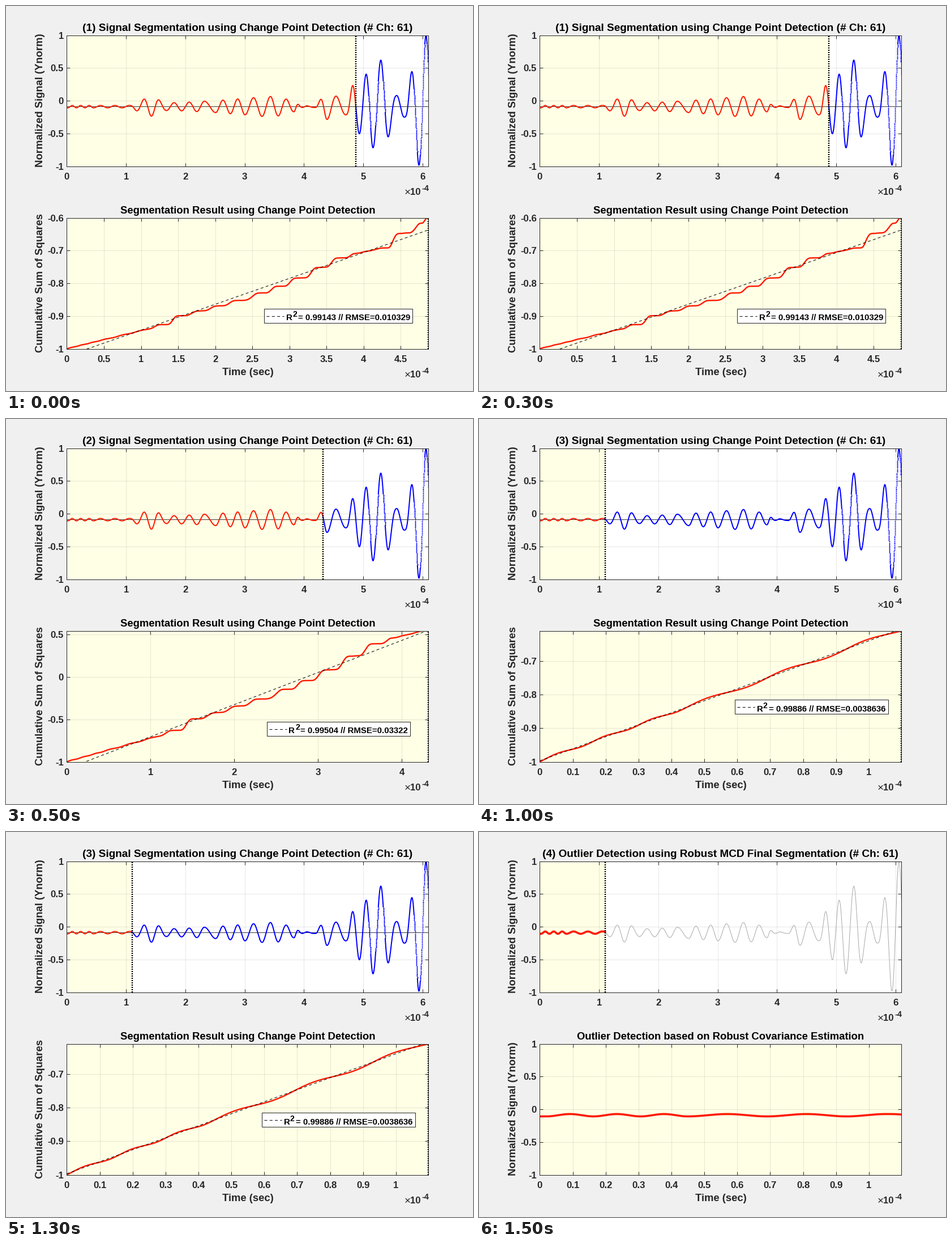
Animation, 825 px wide and 679 px high, one loop 2 s. Source, as a matplotlib script:

```python
import matplotlib.pyplot as plt
import numpy as np
from matplotlib.animation import FuncAnimation
from matplotlib.patches import Rectangle

W, H, DPI = 825, 679, 100
PT = 72 / DPI  # points per pixel
LEFT, RIGHT = 107.4, 746.4
MID = (LEFT + RIGHT) / 2
TOP_BOX, LOW_BOX = (51.6, 282.6), (373.6, 604.6)

INK, RED, BLUE, CREAM = "#262626", "#ff1900", "#0000ff", "#ffffe5"
TICK, LABEL, TITLE, LEGEND = 16.8, 18.5, 19.0, 15.0

plt.rcParams["font.family"] = "Liberation Sans"
fig = plt.figure(figsize=(W / DPI, H / DPI), dpi=DPI, facecolor="#f0f0f0")

MEAN = -.09
# The wave turns at every whole phase; key points of (phase, time in 1e-4 s)
PHASE = [(-12, .02), (-6, .449), (0, 1.173), (9, 2.318), (10, 2.509),
         (14, 3.005), (17, 3.434), (20, 3.835), (23, 4.045), (26, 4.388),
         (28, 4.703), (32, 5.161), (35, 5.566), (40, 6.18)]
# Key points of (phase, swing around the mean)
SWING = [(-12, .018), (-1, .018), (0, .062), (2, .145), (4, .06), (14, .125),
         (17, .155), (19, .115), (22, .012), (24, .012), (26, .195),
         (28, .125), (29, .32), (31, .495), (33, .71), (35, .17), (36, .16),
         (37, .525), (39, 1.09), (40, .91)]

CPD = "Signal Segmentation using Change Point Detection"
MCD = "Outlier Detection using Robust MCD Final Segmentation"
# segment end, upper limit, tick steps in x and y, legend top, legend text
STEPS = [
    (4.873, -.6, .5, .1, 533, "= 0.99143 // RMSE=0.010329"),
    (4.32, .54, 1, .5, 533, "= 0.99504 // RMSE=0.03322"),
    (1.099, -.6105, .1, .1, 494.5, "= 0.99886 // RMSE=0.0038636"),
    (1.099, 1, .1, .5, None, None),
]


def smooth(x, points):
    """Monotone cubic curve through the points."""
    px, py = np.array(points, float).T
    d = np.diff(py) / np.diff(px)
    a, b = d[:-1], d[1:]
    m = np.zeros(len(py))
    same = a * b > 0
    m[1:-1][same] = 2 * a[same] * b[same] / (a + b)[same]
    k = np.clip(np.searchsorted(px, x, side="right") - 1, 0, len(px) - 2)
    h = px[k + 1] - px[k]
    s = (x - px[k]) / h
    r = 1 - s
    return (r * r * (1 + 2 * s) * py[k] + s * s * (3 - 2 * s) * py[k + 1]
            + h * s * r * (r * m[k] - s * m[k + 1]))


time = np.arange(0, 6.0995, .001)
turns, turn_times = zip(*PHASE)
phase = np.interp(time, turn_times, turns)
signal = MEAN - smooth(phase, SWING) * np.cos(np.pi * phase)
steep = np.abs(np.gradient(signal)) * 115.5 > 1.6

# Running energy, levelled at the ends of the segments
cumsq = np.cumsum(signal ** 2)
cuts = np.interp([0, 1.099, 4.32, 4.873], time, cumsq)
energy = np.interp(cumsq, cuts, [0, .15, .77, 1])


def text(x, y, s, size, color=INK, ha="center", weight="bold", angle=0):
    """Text with its baseline at a pixel position."""
    fig.text(x / W, 1 - y / H, s, fontsize=size * PT, color=color, ha=ha,
             va="baseline", weight=weight, rotation=angle,
             rotation_mode="anchor")


def panel(box, xmax, dx, ymax, dy, ylabel):
    top, bottom = box
    xticks = np.arange(0, xmax, dx)
    yticks = np.arange(-1, ymax + 1e-6, dy)
    ax = fig.add_axes([LEFT / W, 1 - bottom / H,
                       (RIGHT - LEFT) / W, (bottom - top) / H])
    ax.set(xlim=(0, xmax), ylim=(-1, ymax), xticks=xticks, yticks=yticks)
    ax.set_axisbelow(True)
    ax.grid(color=INK, alpha=.11, lw=PT)
    ax.tick_params(direction="in", top=True, right=True, length=6.4 * PT,
                   width=PT, color=INK, labelleft=False, labelbottom=False)
    for spine in ax.spines.values():
        spine.set(color=INK, lw=PT)
    for v in xticks:
        x = LEFT + v / xmax * (RIGHT - LEFT)
        text(x, bottom + 23.5, f"{v:g}", TICK)
    for v in yticks:
        y = bottom - (v + 1) / (ymax + 1) * (bottom - top)
        text(101.8, y + 6, f"{v:g}", TICK, ha="right")
    text(709.5, bottom + 51, "×", 19, weight="normal")
    text(714, bottom + 50.5, "10", TICK, ha="left")
    text(747, bottom + 43, "-4", 14.5, ha="right")
    text(65, (top + bottom) / 2 - .7, ylabel, LABEL, angle=90)
    return ax


def divider(ax, x):
    ax.axvline(x, color="black", lw=2.5 * PT, ls=(0, (.8, .8)), zorder=4)


def trace(ax, part, color):
    """Sampled signal: solid where dense, single dots where steep."""
    t, y, s = time[part], signal[part], steep[part]
    ax.plot(t, np.where(s, np.nan, y), color=color, lw=2 * PT)
    ax.plot(t[s], y[s], "o", color=color, ms=2 * PT, mew=0)


def dashed(ax, x, y, **kw):
    ax.plot(x, y, color="black", lw=PT, ls=(0, (5, 4.3)),
            dash_capstyle="butt", **kw)


def legend(y, fit):
    w = 9 * len(fit) + 28
    x = 587 - w / 2
    over = fig.add_axes([0, 0, 1, 1], xlim=(0, W), ylim=(H, 0))
    over.axis("off")
    over.add_patch(Rectangle((x, y + .6), w, 25, fc="white", ec=INK, lw=PT))
    dashed(over, [x + 4, x + 35], [y + 13.6] * 2)
    base = y + 21.5
    text(x + 39, base, "R", LEGEND, "black", "left")
    text(x + 50.5, base - 6, "2", 14, "black", "left")
    text(x + 60, base, fit, LEGEND, "black", "left")


def draw_signal(i, end, final):
    ax = panel(TOP_BOX, 6.1, 1, 1, .5, "Normalized Signal (Ynorm)")
    ax.axvspan(0, end, color=CREAM, lw=0, zorder=.2)
    divider(ax, end)
    inside = time <= end
    if final:
        ax.plot(time[~inside], signal[~inside], color="#a0a0a0", lw=.9 * PT)
        ax.plot(time[inside], signal[inside], color=RED, lw=3.6 * PT)
    else:
        ax.axhline(MEAN, color=INK, lw=.9 * PT, zorder=1.5)
        trace(ax, inside, RED)
        trace(ax, ~inside, BLUE)
    text(MID, 44.3, f"({i + 1}) {MCD if final else CPD} (# Ch: 61)",
         TITLE, "black")


def draw(i):
    fig.clear()
    end, top, dx, dy, legend_y, fit = STEPS[i]
    final = fit is None
    draw_signal(i, end, final)

    low = panel(LOW_BOX, end, dx, top, dy, "Normalized Signal (Ynorm)"
                if final else "Cumulative Sum of Squares")
    low.set_facecolor(CREAM)
    text(MID, 651.3, "Time (sec)", LABEL)
    inside = time <= end
    t = time[inside]
    if final:
        title = "Outlier Detection based on Robust Covariance Estimation"
        low.plot(t, signal[inside], color=RED, lw=3.6 * PT)
    else:
        title = "Segmentation Result using Change Point Detection"
        share = energy[inside]
        curve = (top + 1) * share / share[-1] - 1
        low.plot(t, curve, color=RED, lw=2.4 * PT)
        dashed(low, t, np.polyval(np.polyfit(t, curve, 1), t), zorder=3)
        divider(low, end)
        legend(legend_y, fit)
    text(MID, 366, title, LABEL, "black")


anim = FuncAnimation(fig, draw, frames=len(STEPS), interval=500, repeat=True,
                     repeat_delay=0)
plt.show()
```
